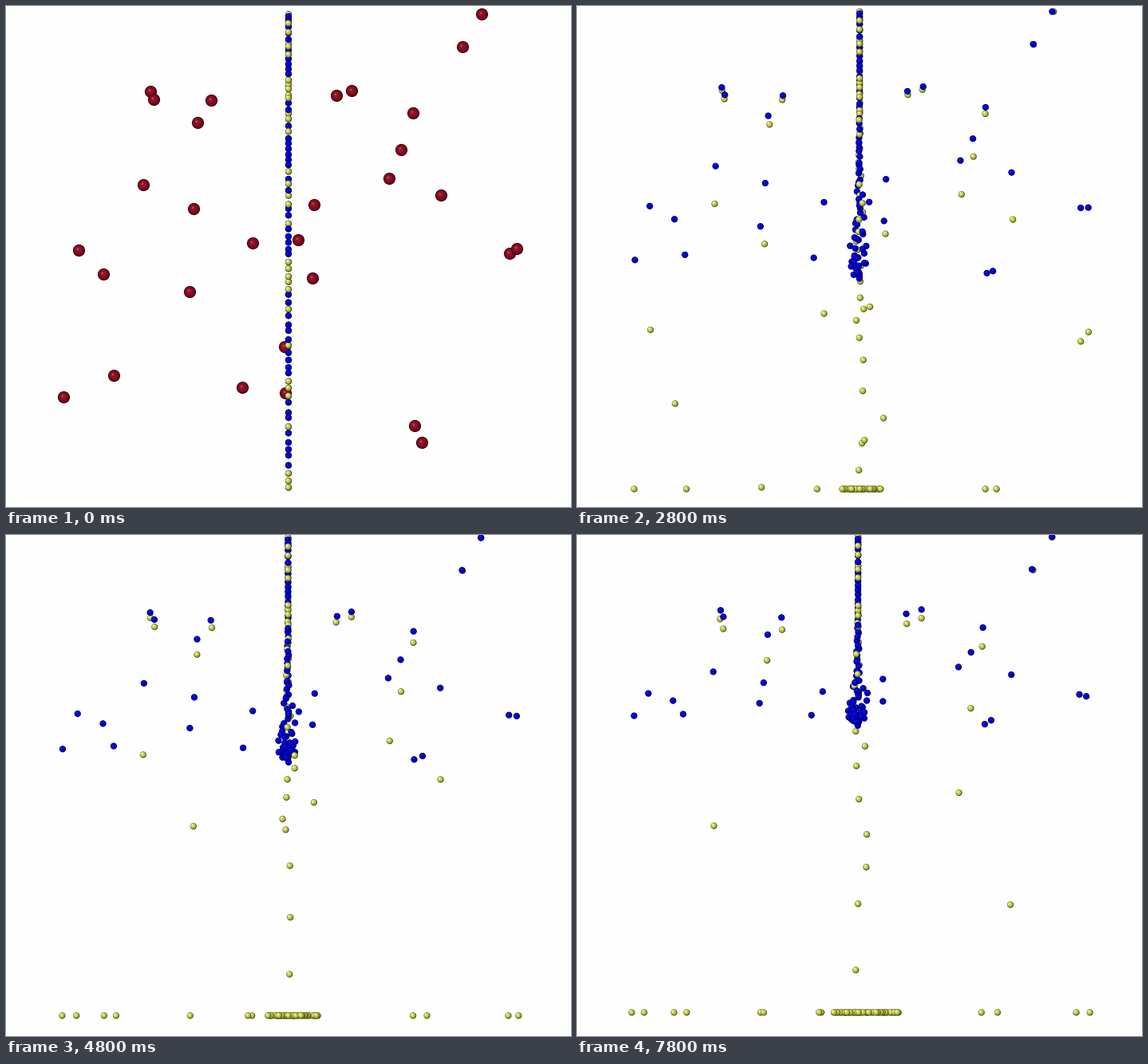
These frames come from a looping animation (708 by 628 pixels, 8000 ms). A matplotlib script:

```python
import numpy as np
import matplotlib.pyplot as plt
from matplotlib.animation import FuncAnimation
from matplotlib.colors import to_rgb

W, H, DPI = 708, 628, 100
FRAMES, STEP = 40, 200
rng = np.random.default_rng(7)

# Where the loose red balls start
LOOSE = [(181, 107), (185, 117), (257, 118), (240, 146), (172, 224),
         (235, 254), (309, 297), (91, 306), (122, 336), (230, 358),
         (135, 463), (296, 478), (72, 490), (349, 427), (350, 485),
         (414, 112), (433, 106), (510, 134), (495, 180), (480, 216),
         (545, 237), (572, 51), (596, 10), (386, 249), (366, 293),
         (384, 341), (631, 310), (640, 304), (512, 526), (521, 547)]
M, COL = len(LOOSE), 80
N = M + COL

# The column is packed more tightly toward the top
col_y = 10 + 593 * np.linspace(0, 1, COL) ** 1.3
col_y[1:-1] += rng.uniform(-2, 2, COL - 2)
x0, y0 = np.vstack([LOOSE, np.c_[np.full(COL, 353.5), col_y]]).T
in_col = np.arange(N) >= M
yellow_front = in_col & (rng.random(N) < 0.46)

# Each red ball or column pair splits: blue rises, yellow sinks.
# Speed grows as y^(P+1), so y^-P changes evenly in time.
P, RATE, LAG, FLOOR = 2.4, 2.13e-7, 0.25, 607
q0, q_floor = y0 ** -P, FLOOR ** -P
rise, sink = RATE * rng.normal(1, 0.03, (2, N))
land = LAG + (q0 - q_floor) / sink

# Sideways scatter, and even places along the bed in order of landing
blue_dx, yellow_dx = np.clip(rng.normal(0, 6, (2, N)), -12, 12)
blue_jit, yellow_jit = rng.normal(0, 0.7, (2, FRAMES, N))
rank = np.argsort(np.argsort(-y0))
bed = (rank * 0.618034) % 1 * 2 - 1
roll = rng.normal(0, 2.5, N)

# Slow drift of the view
KEYS = [0, 1, 2, 4.8, 6.6, 7.8]
VIEW_X = [0, 0.5, 0.5, -0.5, -1.5, -1.8]
VIEW_Y = [0, -2, -2, -7, -6, -8]

# Ball layers: colour, radius, offset toward the light
BLUE = [("#00004c", 4.1, 0), ("#0000c2", 3.6, -0.3), ("#0e0ee6", 1.6, -1)]
YELLOW = [("#50521a", 4.1, 0), ("#b0b83e", 3.5, -0.45),
          ("#d8e070", 2.1, -1), ("#f2f6c0", 0.8, -1.4)]
RED = [("#34000c", 7.6, 0), ("#780a1e", 6.7, -0.3),
       ("#921428", 4, -0.9), ("#c0505f", 1.2, -1.6)]


def blue_pos(i, t):
    y = (q0 + rise * t) ** (-1 / P)
    loose = np.where(in_col, np.clip((y0 - y) / 130, 0, 1), min(t, 1))
    return x0 + (blue_dx * in_col + blue_jit[i]) * loose, y


def yellow_pos(i, t):
    q = q0 - sink * max(t - LAG, 0)
    y = np.maximum(q, q_floor) ** (-1 / P)
    loose = np.where(in_col, np.clip((y - y0) / 80, 0, 1), min(t, 1))
    dx = (yellow_dx * in_col + yellow_jit[i]) * loose
    width = np.where(bed < 0, 17 + 1.7 * t, 14 + 4.8 * t)
    spread = np.clip((t - land) / 0.4, 0, 1)
    rest = roll * np.sqrt(np.clip(t - land, 0, None))
    return x0 + np.where(in_col, dx + (bed * width - dx) * spread,
                         dx + rest), y


def balls(x, y, layers):
    """Centres, radii and colours of every layer of every ball."""
    cols, radii, shift = zip(*layers)
    pts = np.stack([x, y], -1)[:, None] + np.array(shift)[:, None]
    k = len(x)
    return [(pts[j], radii, [to_rgb(c) for c in cols]) for j in range(k)]


mix = rng.permutation(N)
blue_id, yellow_id = np.arange(N), np.arange(N) + N
order = np.r_[np.where(yellow_front, blue_id, yellow_id)[mix],
              np.where(yellow_front, yellow_id, blue_id)[mix]]

fig = plt.figure(figsize=(W / DPI, H / DPI), dpi=DPI, facecolor="#fefefe")
ax = fig.add_axes([0, 0, 1, 1])
ax.set_xlim(0, W)
ax.set_ylim(H, 0)
ax.axis("off")
dots = ax.scatter([], [], linewidths=0)


def draw(i):
    t = i * STEP / 1000
    vx, vy = np.interp(t, KEYS, VIEW_X), np.interp(t, KEYS, VIEW_Y)
    bx, by = blue_pos(i, t)
    yx, yy = yellow_pos(i, t)
    floor_y = np.interp(t, [3.4, 6.6], [605, 598])
    yy = np.where(t >= land, floor_y, np.minimum(yy + vy, floor_y))

    pairs = balls(bx + vx, by + vy, BLUE) + balls(yx + vx, yy, YELLOW)
    if i == 0:
        shown = balls(x0[:M], y0[:M], RED)
        shown += [pairs[j] for j in order if in_col[j % N]]
    else:
        shown = [pairs[j] for j in order]
    pts, radii, cols = (np.concatenate(part) for part in zip(*shown))
    dots.set_offsets(pts + 0.5)
    dots.set_sizes((2 * radii * 72 / DPI) ** 2)
    dots.set_facecolors(cols)
    return dots,


anim = FuncAnimation(fig, draw, frames=FRAMES, interval=STEP, repeat=True,
                     repeat_delay=0, blit=False)
plt.show()
```
